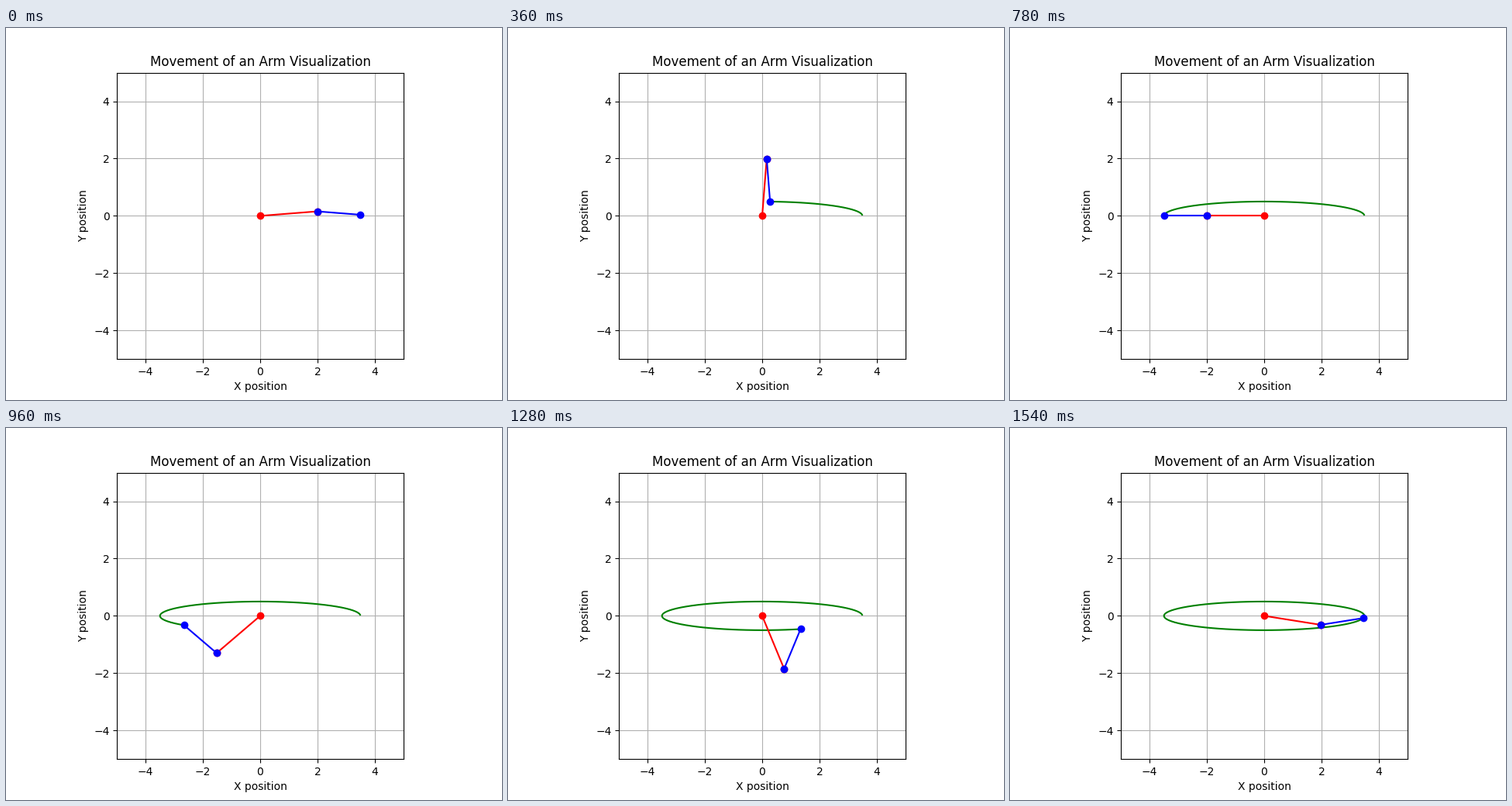
Animation, 640 px wide and 480 px high, one loop 1560 ms. Source, as a matplotlib script:

```python
import numpy as np
import matplotlib.pyplot as plt
from matplotlib.animation import FuncAnimation

FRAMES = 78
STEP = 2 * np.pi / 80
UPPER, FORE = 2.0, 1.5

fig, ax = plt.subplots(figsize=(6.4, 4.8), dpi=100)
ax.set_xlim(-5, 5)
ax.set_ylim(-5, 5)
ax.set_aspect("equal")
ax.grid(True)
ax.set_title("Movement of an Arm Visualization")
ax.set_xlabel("X position")
ax.set_ylabel("Y position")

trail, = ax.plot([], [], "g-")
upper_arm, = ax.plot([], [], "ro-")
forearm, = ax.plot([], [], "bo-")


def joints(angle):
    """Elbow and hand positions; the forearm turns opposite to the upper arm."""
    c, s = np.cos(angle), np.sin(angle)
    elbow = UPPER * c, UPPER * s
    hand = (UPPER + FORE) * c, (UPPER - FORE) * s
    return elbow, hand


def update(i):
    angles = STEP * np.arange(1, i + 2)
    (ex, ey), (hx, hy) = joints(angles)
    trail.set_data(hx, hy)
    upper_arm.set_data([0, ex[-1]], [0, ey[-1]])
    forearm.set_data([ex[-1], hx[-1]], [ey[-1], hy[-1]])
    return trail, upper_arm, forearm


anim = FuncAnimation(fig, update, frames=FRAMES, interval=20, repeat=True)
plt.show()
```
